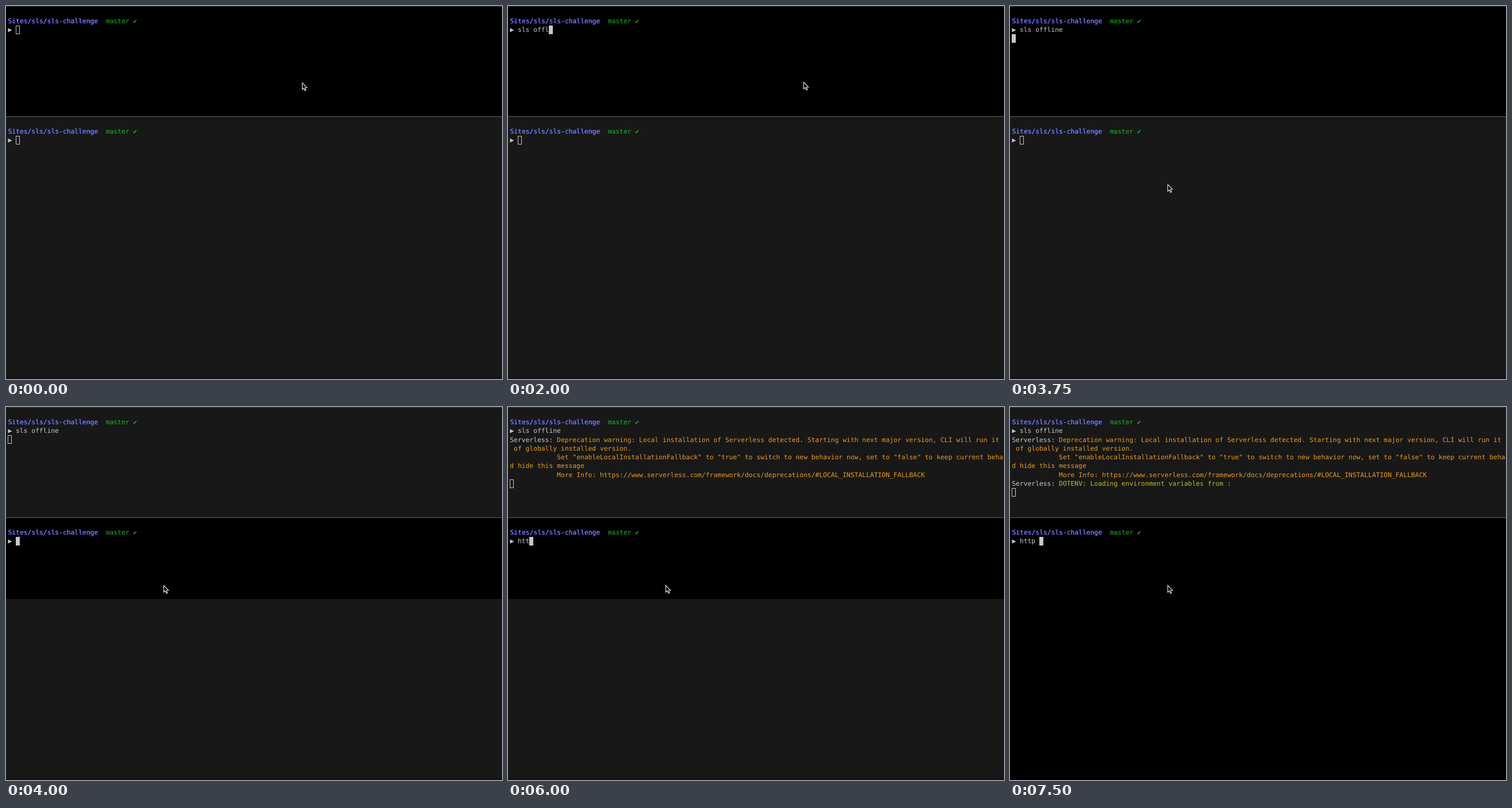
Animation, 863 px wide and 649 px high, one loop 8000 ms. Source, as an HTML page with a canvas:

```html
<!DOCTYPE html>
<html lang="en">
<head>
<meta charset="utf-8">
<title>Split terminal</title>
<style>
  html, body { margin: 0; width: 100%; height: 100%; overflow: hidden; background: #000; }
  canvas { display: block; }
</style>
</head>
<body>
<canvas id="stage" width="863" height="649"></canvas>
<script>
const W = 863, H = 649, LOOP = 8000;
const LEFT = 3.3, CELL = 6.815, ROW = 15.3, SPLIT = 192;
const TOP = 18.7, BOTTOM = 210.6;
const ctx = document.getElementById('stage').getContext('2d');

const BLACK = '#000', DIM = '#181818', GREY = '#c7c7c7', BLUE = '#6f76ff',
      GREEN = '#1fb427', ORANGE = '#e99a1e', YELLOW = '#bdbb2e';

// Steps are [start time, value]; a value holds until the next step.
const command = [[0, ''], [1000, 'sls'], [1250, 'sls '], [1500, 'sls o'], [1750, 'sls of'],
  [2000, 'sls offl'], [2250, 'sls offlin'], [2500, 'sls offline']];
const request = [[0, ''], [5000, 'h'], [6000, 'htt'], [6250, 'http'], [6750, 'http ']];
const pointer = [[0, [514, 132]], [250, [513, 131]], [3000, [503, 167]],
  [3250, [417, 300]], [3500, [279, 316]], [3750, [273, 309]]];
const lit = [[0, SPLIT + 1], [4000, 334], [7500, H]];

const indent = ' '.repeat(12);
const warning = [
  indent + 'Deprecation warning: Local installation of Serverless detected. Starting with next major version, CLI will run it',
  ' of globally installed version.',
  indent + 'Set "enableLocalInstallationFallback" to "true" to switch to new behavior now, set to "false" to keep current beha',
  'd hide this message',
  indent + 'More Info: https://www.serverless.com/framework/docs/deprecations/#LOCAL_INSTALLATION_FALLBACK'
];

function at(steps, t) {
  let value = steps[0][1];
  for (const [start, v] of steps) if (t >= start) value = v;
  return value;
}

function rect(x, y, w, h, color) {
  ctx.fillStyle = color;
  ctx.fillRect(x, y, w, h);
}

function print(text, col, row, top, color) {
  const lead = text.length - text.trimStart().length;
  ctx.fillStyle = color;
  ctx.fillText(text.slice(lead), LEFT + (col + lead) * CELL, top + row * ROW + 11.2);
}

function polygon(points) {
  ctx.beginPath();
  points.forEach(([x, y]) => ctx.lineTo(x, y));
  ctx.closePath();
}

function prompt(top, typed) {
  const path = 'Sites/sls/sls-challenge';
  print(path, 0, 0, top, BLUE);
  print(path, 0.06, 0, top, BLUE);
  print('master ✔', 25, 0, top, GREEN);
  const y = Math.round(top + ROW);
  polygon([[3.5, y + 4.5], [10.5, y + 8], [3.5, y + 11.5]]);
  ctx.fillStyle = GREY;
  ctx.fill();
  print(typed, 2, 1, top, GREY);
}

function cursor(col, row, top, solid) {
  const x = Math.round(LEFT + col * CELL), y = Math.round(top + row * ROW);
  if (solid) return rect(x, y, 7, 15, GREY);
  ctx.strokeStyle = GREY;
  ctx.lineWidth = 1;
  ctx.strokeRect(x + 0.5, y + 0.5, 6, 14);
}

function arrow([x, y]) {
  ctx.save();
  ctx.translate(x + 1.5, y + 1.5);
  polygon([[0, 0], [0, 11.8], [2.6, 9.4], [4.6, 13.8], [6.5, 13], [4.6, 8.8], [8.2, 8.6]]);
  ctx.fillStyle = BLACK;
  ctx.fill();
  ctx.strokeStyle = '#eee';
  ctx.lineWidth = 1.1;
  ctx.stroke();
  ctx.restore();
}

function draw(t) {
  const topActive = t < 4000;
  rect(0, 0, W, SPLIT, topActive ? BLACK : DIM);
  rect(0, SPLIT, W, H - SPLIT, DIM);
  rect(0, SPLIT, W, at(lit, t) - SPLIT, BLACK);
  if (t < 7500) rect(0, 646, W, 3, '#151114');
  rect(0, 0, W, 1, '#3b3b3b');
  rect(0, SPLIT, W, 1, '#626262');

  const typed = at(command, t), query = at(request, t);
  prompt(TOP, typed);
  prompt(BOTTOM, query);

  if (t >= 4750) {
    print('Serverless:', 0, 2, TOP, GREY);
    warning.forEach((line, i) => print(line, 0, 2 + i, TOP, ORANGE));
  }
  if (t >= 7500) {
    print('Serverless:', 0, 7, TOP, GREY);
    print('DOTENV: Loading environment variables from :', 12, 7, TOP, YELLOW);
  }

  if (t < 2750) cursor(2 + typed.length, 1, TOP, t >= 250);
  else cursor(0, at([[0, 2], [4750, 7], [7500, 8]], t), TOP, topActive);
  cursor(2 + query.length, 1, BOTTOM, !topActive);
  arrow(at(pointer, t));
}

ctx.font = '11.32px "DejaVu Sans Mono", monospace';
ctx.textRendering = 'geometricPrecision';

const begin = performance.now();
function tick() {
  draw((performance.now() - begin) % LOOP);
  requestAnimationFrame(tick);
}
tick();
</script>
</body>
</html>
```
